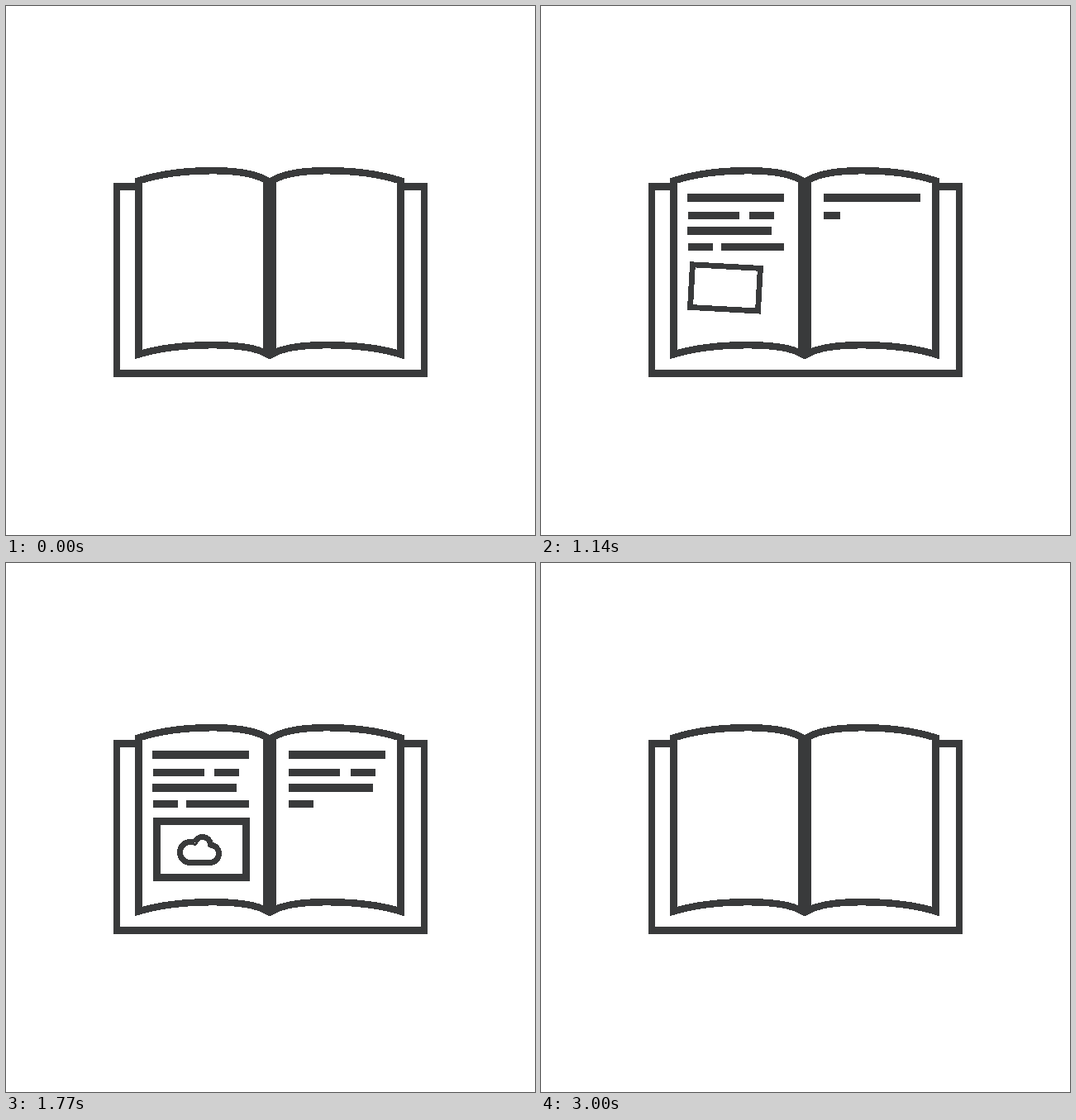
These frames come from a looping animation (640x640 px, 3.63 s). An HTML page:

```html
<!DOCTYPE html>
<html lang="en">
<head>
<meta charset="utf-8">
<title>Book</title>
<style>
html, body { margin: 0; width: 100%; height: 100%; overflow: hidden; background: #fff; }
svg { display: block; width: 100vw; height: 100vh; shape-rendering: crispEdges; }
.ink { fill: none; stroke: #393a3b; stroke-width: 8.5; }
.page { fill: #fff; stroke: #393a3b; stroke-width: 8.5; stroke-miterlimit: 10; }
rect.bar { fill: #393a3b; }
</style>
</head>
<body>
<svg viewBox="0 0 640 640">
  <defs>
    <path id="leaf" class="page" d="M323 210.500C337 203 360 199.200 388 199.200C420 199.200 450 202.700 477.600 211.500V421.500C450 413.200 420 410.200 388 410.200C360 410.200 337 413 323 420.500Z"/>
  </defs>
  <rect class="ink" x="134.1" y="218.4" width="371.800" height="226.200"/>
  <use href="#leaf" transform="translate(638 0) scale(-1 1)"/>
  <use href="#leaf"/>
  <g id="left">
    <g id="picture"><rect class="ink" style="stroke-width:9" x="-3.5" y="-2" width="108" height="68"/></g>
    <g id="cloud">
      <path class="ink" style="stroke-width:7;stroke-linejoin:round" d="M223 362.500A12.500 12.500 0 0 1 223 337.500Q226 337 228.500 338.500A9.700 9.700 0 0 1 247.500 341A10.800 10.800 0 0 1 248 362.500Z"/>
    </g>
  </g>
  <use id="turning" href="#leaf"/>
  <g id="right"></g>
</svg>
<script>
const STEP = 30, LOOP = 3630, SPINE = 319;
const TURN = 85, TURN_LEN = 15;
const $ = id => document.getElementById(id);
const clamp = v => Math.max(0, Math.min(1, v));
const ease = p => p < 0.5 ? 2 * p * p : 1 - 2 * (1 - p) * (1 - p);
const progress = (n, from, to) => clamp((n - from) / (to - from));
const mix = (a, b, p) => a + (b - a) * p;

// side, x, y, width, height, first step, last step
const bars = [
  ['left', 177, 227, 117, 10, 0, 7],
  ['left', 178, 249, 62, 9, 6, 11],
  ['left', 252, 249, 30, 9, 10, 15],
  ['left', 177, 267, 102, 10, 15, 20],
  ['left', 178, 287, 30, 9, 20, 25],
  ['left', 218, 287, 76, 9, 24, 31],
  ['right', 342, 227, 117, 10, 30, 37],
  ['right', 342, 249, 62, 9, 36, 41],
  ['right', 417, 249, 30, 9, 40, 45],
  ['right', 342, 267, 102, 10, 45, 50],
  ['right', 342, 287, 30, 9, 50, 55]
].map(([side, x, y, w, h, from, to]) => {
  const el = document.createElementNS('http://www.w3.org/2000/svg', 'rect');
  el.setAttribute('class', 'bar');
  el.setAttribute('x', x);
  el.setAttribute('y', y);
  el.setAttribute('height', h);
  $(side).append(el);
  return { el, w, from, to };
});

function show(el, on) {
  el.setAttribute('visibility', on ? 'visible' : 'hidden');
}

function squeeze(el, k) {
  el.setAttribute('transform', `translate(${SPINE} 0) scale(${k} 1) translate(${-SPINE} 0)`);
}

// The picture frame swings open, springs back and settles.
function pose(n) {
  if (n < 41) {
    const p = progress(n, 32, 41);
    return [1.14 * p, 4.1 * ease(p)];
  }
  if (n < 50) {
    const p = ease(progress(n, 41, 50));
    return [mix(1.14, 0.705, p), mix(4.1, -4.1, p)];
  }
  const p = ease(progress(n, 50, 59));
  return [mix(0.705, 1, p), mix(-4.1, 0, p)];
}

function draw(t) {
  const n = Math.floor((t % LOOP) / STEP + 1e-6);
  const p = progress(n, TURN, TURN + TURN_LEN);
  const written = p < 1;

  for (const b of bars) b.el.setAttribute('width', b.w * ease(progress(n, b.from, b.to)));

  const [size, angle] = pose(n);
  $('picture').setAttribute('transform', `translate(186 314.5) rotate(${angle}) scale(${size})`);
  show($('picture'), written && size > 0);

  const puff = ease(progress(n, 50, 58));
  $('cloud').setAttribute('transform', `translate(234.5 347) scale(${puff}) translate(-234.5 -347)`);
  show($('cloud'), written && puff > 0);
  show($('left'), written);

  // Text on the bent sheet narrows sooner than its outer edge.
  const a = Math.PI * p;
  const edge = Math.cos(a);
  const text = edge - 0.4 * Math.sin(a);
  squeeze($('turning'), edge);
  show($('turning'), p > 0 && written);
  squeeze($('right'), Math.max(0, text));
  show($('right'), text > 0);
}

let start;
function tick(now) {
  if (start === undefined) start = now;
  draw(Math.max(0, now - start));
  requestAnimationFrame(tick);
}
draw(0);
requestAnimationFrame(tick);
</script>
</body>
</html>
```
